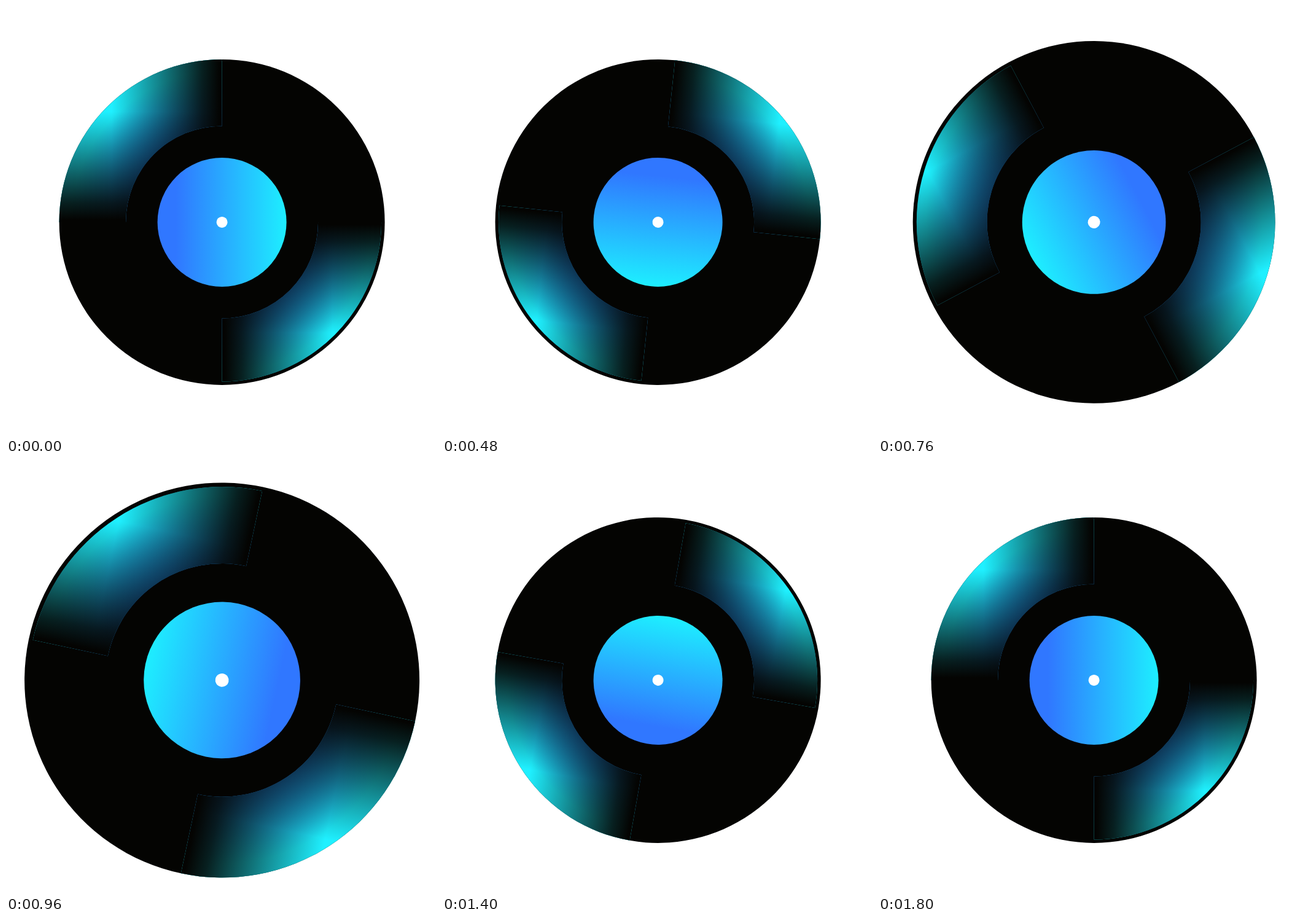
Animation of 700 by 700 pixels, one loop 1.84 s. Source, as an HTML page:

```html
<!DOCTYPE html>
<html lang="en">
<head>
<meta charset="utf-8">
<title>Spinning record</title>
<style>
  html, body { margin: 0; height: 100%; overflow: hidden; background: #fff; }
  svg { display: block; width: 700px; height: 700px; }
</style>
</head>
<body>
<svg viewBox="0 0 700 700">
  <defs>
    <radialGradient id="shine" gradientUnits="userSpaceOnUse" cx="0" cy="0" r="265">
      <stop offset=".59" stop-color="#209cff"/>
      <stop offset=".93" stop-color="#1ff0ff"/>
    </radialGradient>
    <!-- Shadows that darken the shine towards its two straight sides -->
    <linearGradient id="fadeX" gradientUnits="userSpaceOnUse" x1="-4" y1="0" x2="-180" y2="0">
      <stop stop-color="#040402"/>
      <stop offset=".16" stop-color="#040402" stop-opacity=".88"/>
      <stop offset="1" stop-color="#040402" stop-opacity="0"/>
    </linearGradient>
    <linearGradient id="fadeY" href="#fadeX" x1="0" y1="-4" x2="0" y2="-180"/>
    <linearGradient id="label" gradientUnits="userSpaceOnUse" x1="-75" y1="0" x2="100" y2="0">
      <stop stop-color="#3077ff"/>
      <stop offset="1" stop-color="#1eebff"/>
    </linearGradient>
  </defs>
  <g id="record">
    <circle r="265" fill="#040402"/>
    <g id="glosses"></g>
    <circle r="105" fill="url(#label)"/>
    <circle r="9" fill="#fff"/>
  </g>
</svg>
<script>
  const FRAME = 40, FRAMES = 46, STEP = 8;
  const GROW = 15, PEAK = 23, REST = 30, SWELL = 0.2256;
  const record = document.getElementById('record');

  // A quarter ring in the upper left, lit and then shaded from both sides
  function gloss(outer, turn) {
    const inner = 156.5;
    const d = `M${-inner} 0A${inner} ${inner} 0 0 1 0 ${-inner}V${-outer}A${outer} ${outer} 0 0 0 ${-outer} 0Z`;
    const layers = ['shine', 'fadeX', 'fadeY'].map(id => `<path d="${d}" fill="url(#${id})"/>`);
    return `<g transform="rotate(${turn})">${layers.join('')}</g>`;
  }
  document.getElementById('glosses').innerHTML = gloss(265, 0) + gloss(259.5, 180);

  function ease(x) {
    x = Math.max(0, Math.min(1, x));
    return x * x * (3 - 2 * x);
  }

  function draw() {
    const frame = Math.floor(performance.now() / FRAME) % FRAMES;
    const swell = frame < PEAK
      ? ease((frame - GROW) / (PEAK - GROW))
      : ease((REST - frame) / (REST - PEAK));
    record.setAttribute('transform',
      `translate(351.6 351.9) rotate(${frame * STEP}) scale(${1 + SWELL * swell})`);
    requestAnimationFrame(draw);
  }
  draw();
</script>
</body>
</html>
```
